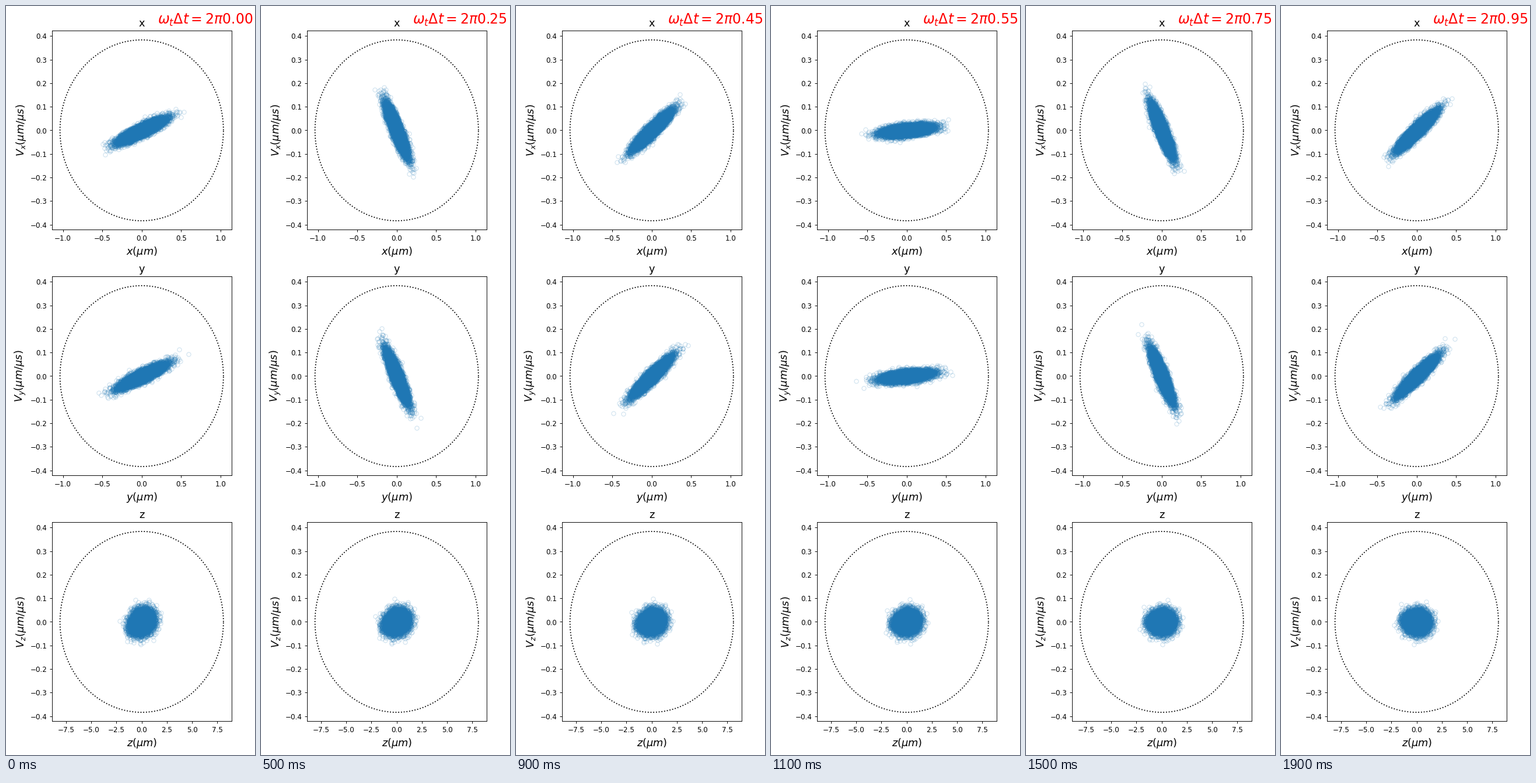
A matplotlib script for the animation above (2000 ms loop, 427 by 1280 pixels).

```python
import numpy as np
import matplotlib.pyplot as plt
from matplotlib.animation import FuncAnimation

W, H, DPI = 427, 1280, 256 / 3
FRAMES, INTERVAL = 20, 100
ATOMS = 10000
V_MAX = 0.3835      # edge of the trap in velocity
SPREAD = 0.064      # thermal width relative to the trap edge
FLIGHT = 5.0        # free expansion time before the rotation, in us
R_RADIAL, R_AXIAL = 1.037, 8.1

plt.rcParams["font.family"] = "DejaVu Sans"
rng = np.random.default_rng(12)

# name, trap radius, stray atoms far from the core as (position, velocity)
PANELS = [
    ("x", R_RADIAL, [(-0.467, -0.104), (0.04, 0.059), (0.434, 0.09)]),
    ("y", R_RADIAL, [(0.594, 0.094), (0.477, 0.112), (-0.549, -0.07),
                     (-0.158, 0.026)]),
    ("z", R_AXIAL, [(-0.6, 0.093), (-2.2, 0.004), (-0.08, -0.096),
                    (1.2, -0.077)]),
]


def make_cloud(radius, strays):
    """Thermal cloud sheared by free flight, in units of the trap edge."""
    r = np.minimum(rng.rayleigh(1, ATOMS), rng.uniform(3.6, 4.0, ATOMS))
    angle = rng.uniform(0, 2 * np.pi, ATOMS)
    q, p = SPREAD * r * np.cos(angle), SPREAD * r * np.sin(angle)
    q = q + p * FLIGHT * V_MAX / radius
    far = np.array(strays) / (radius, V_MAX)
    return np.append(q, far[:, 0]), np.append(p, far[:, 1])


def make_panel(row, name, radius):
    bottom = H - 382.5 - 420 * row
    ax = fig.add_axes([78.57 / W, bottom / H, 308.3 / W, 340 / H])
    ax.set_xlim(-1.1 * radius, 1.1 * radius)
    ax.set_ylim(-1.1 * V_MAX, 1.1 * V_MAX)
    ax.set_title(name, fontsize=15)
    ax.set_xlabel(rf"${name}(\mu m)$", fontsize=15)
    ax.set_ylabel(rf"$V_{name}(\mu m/\mu s)$", fontsize=15)
    t = np.linspace(0, 2 * np.pi, 400)
    ax.plot(radius * np.cos(t), V_MAX * np.sin(t), "k:", lw=1.5, zorder=3)
    dots, = ax.plot([], [], "o", mfc="none", mec="C0", alpha=0.2)
    return ax, dots


fig = plt.figure(figsize=((W + 0.01) / DPI, (H + 0.01) / DPI), dpi=DPI,
                 facecolor="white")
clouds = []
for row, (name, radius, strays) in enumerate(PANELS):
    ax, dots = make_panel(row, name, radius)
    clouds.append((dots, radius, *make_cloud(radius, strays)))
    if row == 0:
        phase_text = ax.text(0.2, 0.45, "", color="red", fontsize=20)


def update(frame):
    turn = frame / FRAMES
    for dots, radius, q, p in clouds:
        phi = 2 * np.pi * turn * R_RADIAL / radius
        c, s = np.cos(phi), np.sin(phi)
        dots.set_data(radius * (q * c + p * s), V_MAX * (p * c - q * s))
    phase_text.set_text(rf"$\omega_t\Delta t = 2\pi{turn:.2f}$")
    return [phase_text] + [cloud[0] for cloud in clouds]


anim = FuncAnimation(fig, update, frames=FRAMES, interval=INTERVAL,
                     repeat=True, repeat_delay=0)
plt.show()
```
